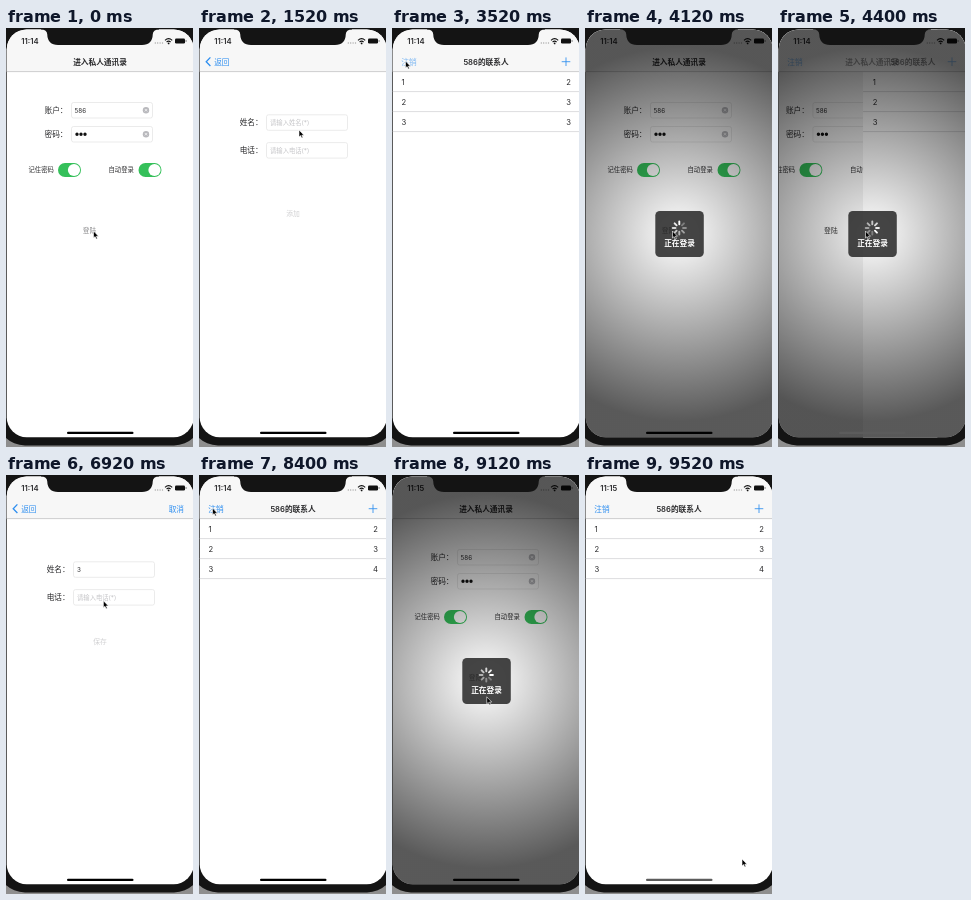
An HTML page that plays this animation: 187x419 px, repeating every 9640 ms.

```html
<!DOCTYPE html>
<html lang="zh">
<head>
<meta charset="utf-8">
<title>通讯录</title>
<style>
html, body { margin: 0; width: 100%; height: 100%; overflow: hidden; background: #8e8e8e; }
svg { display: block; width: 187px; height: 419px; }
text { font: 7.68px Inter, "Noto Sans CJK SC", "Noto Sans CJK", sans-serif; fill: #2a2a2c; white-space: pre; }
.small { font-size: 6.32px; }
.button { font-size: 6.8px; }
.big { font-size: 9px; }
.bold { font-weight: 600; }
.mid { text-anchor: middle; }
.end { text-anchor: end; }
.blue { fill: #2f8ff0; }
.hint { fill: #c4c4c7; }
.white { fill: #fff; }
.field { fill: #fff; stroke: #e2e2e2; stroke-width: .7; }
.line { stroke: #cfcfd1; stroke-width: .7; }
.stroke { fill: none; stroke: #2f8ff0; }
</style>
</head>
<body>
<svg viewBox="0 0 187 419">
  <defs>
    <clipPath id="glass"><rect x=".7" y="1.4" width="187" height="407.8" rx="20"/></clipPath>
    <radialGradient id="shade" gradientUnits="userSpaceOnUse" cx="93.5" cy="206" r="187">
      <stop offset="0" stop-opacity="0"/><stop offset="1" stop-opacity=".65"/>
    </radialGradient>
    <g id="clear">
      <circle r="3.2" fill="#b9b9bd"/>
      <path d="M-1.2-1.2 1.2 1.2M1.2-1.2-1.2 1.2" stroke="#fff" stroke-width=".7"/>
    </g>
    <g id="switch">
      <rect width="23" height="14" rx="7" fill="#35c05a"/>
      <circle cx="16" cy="7" r="6.1" fill="#fff"/>
    </g>
    <rect id="box" class="field" width="81" height="15.5" rx="2"/>
    <rect id="sheetBox" x="4" width="179" rx="6" fill="#f8f8f9"/>
  </defs>

  <rect x="-9" y="-30" width="205" height="447.5" rx="28" fill="#141414"/>

  <g clip-path="url(#glass)">
    <g id="page0">
      <rect width="190" height="419" class="white"/>
      <text x="38.5" y="84.8">账户：</text>
      <text x="38.5" y="108.8">密码：</text>
      <use href="#box" x="65.5" y="74.5"/>
      <use href="#box" x="65.5" y="98.5"/>
      <text class="small" x="68.5" y="84.6">586</text>
      <path d="M71 106.3h0M75 106.3h0M79 106.3h0" stroke="#111" stroke-width="3.4" stroke-linecap="round"/>
      <use href="#clear" x="140" y="82.2"/>
      <use href="#clear" x="140" y="106.2"/>
      <text class="small" x="22.5" y="144">记住密码</text>
      <use href="#switch" x="52" y="135"/>
      <text class="small" x="102.5" y="144">自动登录</text>
      <use href="#switch" x="132.5" y="135"/>
      <text class="button" id="login" x="76.7" y="204.6">登陆</text>
    </g>

    <g id="page1"><rect width="190" height="419" class="white"/></g>

    <g id="page2">
      <rect width="190" height="419" class="white"/>
      <text x="40.7" y="97">姓名：</text>
      <text x="40.7" y="124.8">电话：</text>
      <use href="#box" x="67.5" y="86.8"/>
      <use href="#box" x="67.5" y="114.6"/>
      <text class="small" x="71" y="96.9" id="name"></text>
      <text class="small" x="71" y="124.7" id="phone"></text>
      <text class="button mid" x="94" id="submit"></text>
    </g>

    <rect width="190" height="43.5" fill="#f7f7f7"/>
    <path d="M0 43.6H190" stroke="#bcbcbe" stroke-width=".7"/>
    <g id="nav0">
      <text class="bold mid" x="94" y="36.7" id="title0">进入私人通讯录</text>
    </g>
    <g id="nav1">
      <text class="blue" x="9.3" y="36.7" id="logout">注销</text>
      <text class="bold mid" x="94" y="36.7" id="title1">586的联系人</text>
      <path class="stroke" stroke-width=".85" d="M169.7 33.7H178.3M174 29.4V38"/>
    </g>
    <g id="nav2">
      <path class="stroke" stroke-width="1.3" d="M11.4 29.4 7.2 33.7 11.4 38"/>
      <text class="blue" x="15.2" y="36.7">返回</text>
      <text class="blue end" x="178" y="36.7" id="edit"></text>
    </g>

    <text class="bold" x="15.3" y="15.9" id="clock"></text>
    <path d="M149.3 15h0M151.7 15h0M154.1 15h0M156.5 15h0" stroke="#aaa" stroke-width="1.4" stroke-linecap="round"/>
    <path d="M159 12.3Q162.6 9 166.2 12.3M160.6 14Q162.6 12.2 164.6 14" fill="none" stroke="#111" stroke-width="1.1"/>
    <circle cx="162.6" cy="15.4" r=".9" fill="#111"/>
    <rect x="169" y="10.6" width="10" height="4.9" rx="1.3" fill="#111"/>
    <rect x="179.6" y="12.1" width=".9" height="2" rx=".4" fill="#777"/>

    <g id="hud">
      <rect width="190" height="419" fill="url(#shade)"/>
      <rect x="70.3" y="183" width="48.5" height="46" rx="4.5" fill="#2b2b2b" fill-opacity=".87"/>
      <g id="spinner" stroke="#fff" stroke-width="1.9" stroke-linecap="round"></g>
      <text class="bold mid white" x="94.5" y="218">正在登录</text>
    </g>

    <rect id="dim" width="190" height="419"/>
    <g id="sheet">
      <use href="#sheetBox" y="308" style="height:47px"/>
      <rect x="4" y="308" width="179" height="47" rx="6" fill="#f8f8f9"/>
      <path class="line" d="M4 328H183"/>
      <text class="small mid hint" x="93.5" y="320.5">确定要注销?</text>
      <text class="big mid" x="93.5" y="345" style="fill:#ff3b30">确定</text>
      <rect x="4" y="359" width="179" height="26" rx="6" class="white"/>
      <text class="big mid bold blue" x="93.5" y="375.3">取消</text>
    </g>
    <rect id="home" x="61" y="403.8" width="66.5" height="2.3" rx="1.1"/>
  </g>

  <path d="M35 0V1.4Q41 1.6 41.2 6Q41.6 17 52 17H136Q146.4 17 146.8 6Q147 1.6 153 1.4V0Z" fill="#141414"/>
  <path id="cursor" d="M0 0V7L1.6 5.6 2.7 8.1 3.9 7.6 2.8 5.2H5Z" fill="#000" stroke="#fff" stroke-width=".6"/>
</svg>

<script>
const $ = id => document.getElementById(id);
const LOOP = 9640, WIDTH = 187, LAST = 95;

// The session, in ticks of about 100 ms
const logins = [0, 40, 89];
const logouts = [35, 84];
const add = { open: 10, name: 19, phone: 22, save: 25 };
const change = { open: 55, edit: 62, erase: 69, phone: 70, save: 75 };

const spots = {
  login: [87.5, 203], plus: [172, 33], name: [100, 102], phone: [98, 121], add: [92, 184],
  logout: [13.5, 33], confirm: [92, 338], row: [135, 94], edit: [167, 33], save: [92, 166], rest: [157, 384]
};

// Where the pointer has arrived at each tick
const visits = [
  [0, 'login'], [9, 'plus'], [15, 'name'], [21, 'phone'], [25, 'add'],
  [35, 'logout'], [37, 'confirm'], [40, 'login'], [53, 'row'], [62, 'edit'],
  [65, 'phone'], [73, 'save'], [84, 'logout'], [86, 'confirm'], [88, 'login'], [LAST, 'rest']
];

const clamp = v => Math.min(1, Math.max(0, v));
const ramp = (n, from, span = 2) => clamp((n - from) / span);
const slide = (n, from) => Math.sin(ramp(n, from) * Math.PI / 2) ** 1.75;
const total = (list, f) => list.reduce((sum, item) => sum + f(item), 0);

// 0 login, 1 contacts, 2 form; fractions are pages in motion
function depth(n) {
  return total(logins, t => slide(n, t + 3)) - total(logouts, t => slide(n, t + 2)) +
    total([add, change], f => slide(n, f.open) - slide(n, f.save));
}

function pointer(n) {
  const i = Math.max(1, visits.findIndex(v => v[0] >= n));
  const [[t0, from], [t1, to]] = [visits[i - 1], visits[i]];
  const span = Math.min(5, t1 - t0);
  const k = ramp(n, t1 - span, span), ease = k * k * (3 - 2 * k);
  return spots[from].map((v, j) => v + (spots[to][j] - v) * ease);
}

const set = (id, key, value) => $(id).setAttribute(key, value);
const move = (id, x, y = 0) => set(id, 'transform', `translate(${x} ${y})`);
const write = (id, text) => { if ($(id).textContent !== text) $(id).textContent = text; };

function input(id, text, hint) {
  write(id, text || hint);
  $(id).classList.toggle('hint', !text);
}

function build() {
  for (let i = 0; i < 3; i++) {
    const y = 56.6 + i * 20.05;
    $('page1').insertAdjacentHTML('beforeend', `<g id="row${i}">
      <text x="9.6" y="${y}">${i + 1}</text>
      <text class="end" x="179" y="${y}" id="value${i}">${Math.min(i + 2, 3)}</text>
      <path class="line" d="M0 ${63.6 + i * 20}H190"/></g>`);
  }
  for (let i = 0; i < 8; i++) {
    $('spinner').insertAdjacentHTML('beforeend',
      `<path d="M94.3 196.2V193.4" transform="rotate(${i * 45} 94.3 200)"/>`);
  }
  for (const k of [0, 1]) {
    $('page' + k).insertAdjacentHTML('beforeend', `<rect id="cover${k}" width="190" height="419"/>`);
  }
}

function pages(d) {
  for (let k = 0; k < 3; k++) {
    const gap = k - d;
    move('page' + k, gap * WIDTH * (gap > 0 ? 1 : .3));
    set('page' + k, 'visibility', Math.abs(gap) < 1 ? 'visible' : 'hidden');
    set('nav' + k, 'opacity', clamp(1 - Math.abs(gap)));
    if (k < 2) {
      move('title' + k, Math.max(0, gap) * WIDTH * .48);
      set('cover' + k, 'opacity', clamp(-gap) * .1);
    }
  }
}

function form(n) {
  const adding = n < change.open, editing = n >= change.edit;
  const name = n >= add.name ? '3' : '';
  const phone = n >= change.phone ? '4' : n >= add.phone && n < change.erase ? '3' : '';
  input('name', name, '请输入姓名(*)');
  input('phone', phone, '请输入电话(*)');
  write('edit', adding ? '' : editing ? '取消' : '编辑');
  write('submit', adding ? '添加' : editing ? '保存' : '');
  set('submit', 'y', adding ? 188.4 : 169.4);
  $('submit').style.fill = name && phone ? '#333' : '#d0d0d2';
}

function draw(n) {
  const sinceLogin = n - logins.findLast(t => t <= n);
  pages(depth(n));
  form(n);
  set('row2', 'opacity', n > add.save ? 1 : 0);
  write('value2', n > change.save ? '4' : '3');
  write('clock', n < logouts[1] + 4 ? '11:14' : '11:15');
  $('login').style.fill = sinceLogin ? '#333' : '#8c8c8e';
  set('logout', 'opacity', n === logouts[0] ? .6 : 1);

  set('hud', 'opacity', ramp(sinceLogin, 0, 1) * (1 - ramp(sinceLogin, 4)));
  [...$('spinner').children].forEach((spoke, i) =>
    spoke.setAttribute('opacity', .3 + (i - n + 96) % 8 / 10));
  const up = total(logouts, t => ramp(n, t) * (n < t + 3 ? 1 : 0));
  set('dim', 'opacity', up * .35);
  move('sheet', 0, (1 - up) * 112);
  set('home', 'fill', sinceLogin > 3 && sinceLogin < 14 ? '#5c5c5c' : '#000');
  move('cursor', ...pointer(n));
}

// Ticks alternate between 120 and 80 ms
function tick(ms) {
  const n = 2 * Math.floor(ms / 200) + (ms % 200 >= 120 ? 1 : 0);
  return Math.min(n, LAST);
}

build();
let start;
function frame() {
  const now = performance.now();
  start ??= now;
  draw(tick((now - start) % LOOP));
  requestAnimationFrame(frame);
}
frame();
</script>
</body>
</html>
```
